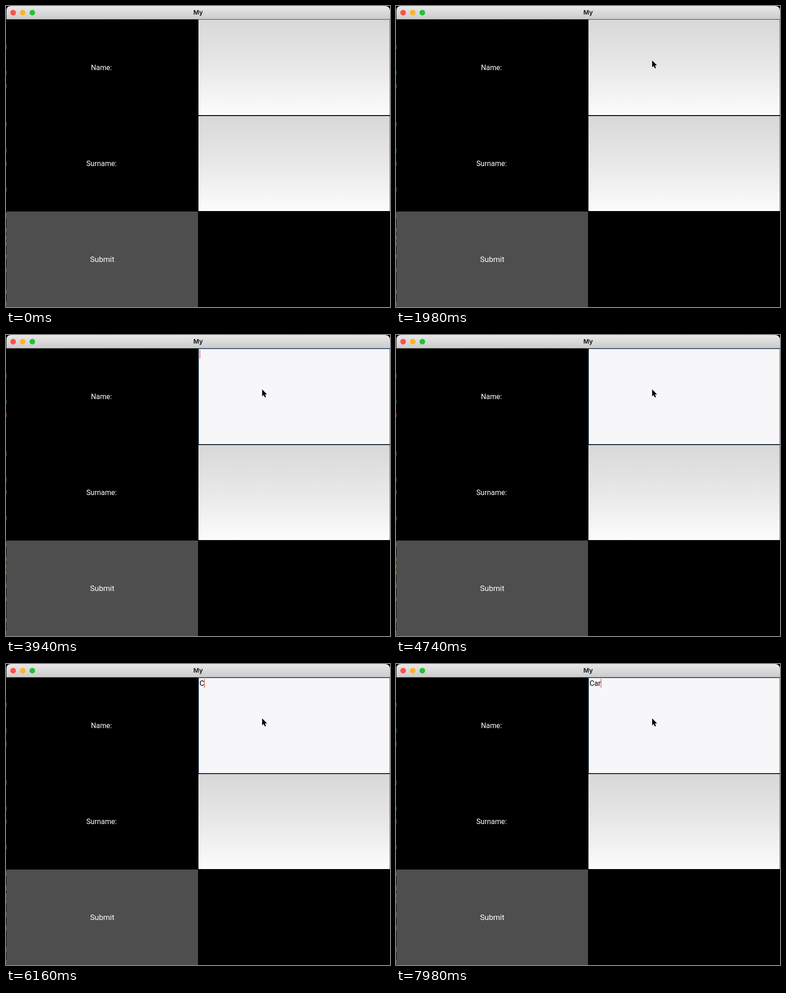
Animation of 846x662 px, one loop 8 s. Source, as an HTML page:

```html
<!DOCTYPE html>
<html lang="en">
<head>
<meta charset="utf-8">
<title>My</title>
<style>
  html, body { margin: 0; width: 100%; height: 100%; overflow: hidden; background: #000; }
  svg { display: block; width: 100vw; height: 100vh; }
  text { font-family: Roboto, sans-serif; font-size: 15.9px; fill: #fff; }
  .mid { text-anchor: middle; }
  .title { font: 700 13.7px Inter, sans-serif; fill: #262626; }
</style>
</head>
<body>
<svg viewBox="0 0 846 662">
  <defs>
    <linearGradient id="bar" x2="0" y2="1">
      <stop stop-color="#e8e8e8"/><stop offset="1" stop-color="#cbcbcb"/>
    </linearGradient>
    <linearGradient id="field" x2="0" y2="1">
      <stop stop-color="#d8d8d9"/><stop offset=".5" stop-color="#e8e8e9"/><stop offset="1" stop-color="#fcfcfd"/>
    </linearGradient>
  </defs>
  <rect width="846" height="662"/>
  <g id="edge"></g>
  <path d="M1 29V10Q1 0 11 0H835Q845 0 846 10V29Z" fill="url(#bar)"/>
  <rect x="1" y="29" width="845" height="1" fill="#3a3a3a"/>
  <circle cx="15.7" cy="14.7" r="6.2" fill="#fe5049"/>
  <circle cx="36.8" cy="14.7" r="6.2" fill="#fdb32b"/>
  <circle cx="58" cy="14.7" r="6.2" fill="#20c336"/>
  <text class="mid title" x="423.3" y="19.3">My</text>

  <rect x="424" y="30" width="421.5" height="210" fill="url(#field)"/>
  <rect x="424" y="242" width="421.5" height="209" fill="url(#field)"/>
  <g id="focus">
    <rect x="424" y="29" width="422" height="212" fill="#17324c"/>
    <rect x="424" y="30" width="422" height="210" fill="#497496"/>
    <rect x="425" y="31" width="420" height="209" fill="#f7f7f9"/>
  </g>
  <rect x="1" y="452" width="422" height="210" fill="#4e4e4e"/>

  <text class="mid" x="210.3" y="140.5">Name:</text>
  <text class="mid" x="210.5" y="351.7">Surname:</text>
  <text class="mid" x="212" y="563.4" style="font-size:17px">Submit</text>
  <text id="typed" x="426.5" y="47.8" style="fill:#000"></text>
  <rect id="caret" y="33" width="1.1" height="19" fill="#e62020"/>
  <path id="mouse" d="M0 0V15.5L3.5 12.3L5.9 17.8L8.5 16.7L6.1 11.3H10.8Z"
    stroke="#fff" stroke-width="1.8" paint-order="stroke" stroke-linejoin="round"/>
</svg>
<script>
const LOOP = 8000, FOCUS = 2855, BLINK = 530;
const ENTER = 1200, ARRIVE = 1700;
const keys = [
  { at: FOCUS, text: "", x: 426.6 },
  { at: 6100, text: "C", x: 436.9 },
  { at: 6640, text: "Ca", x: 445.6 },
  { at: 7600, text: "Car", x: 451 }
];
const el = id => document.getElementById(id);
const show = (node, on) => node.setAttribute("visibility", on ? "visible" : "hidden");
const [focus, typed, caret, mouse] = ["focus", "typed", "caret", "mouse"].map(el);

// Slivers of the window behind, along the left edge
el("edge").innerHTML = [90, 147, 176, 261, 318, 346, 403, 461, 493, 509, 522, 551, 581, 628, 655]
  .map((y, i) => `<rect y="${y - 5}" width="1" height="10" fill="${i % 3 == 1 && i < 5 ? "#24718c" : "#6c6c4a"}"/>`)
  .join("");

function draw(t) {
  const p = Math.min(1, Math.max(0, (t - ENTER) / (ARRIVE - ENTER)));
  const away = (1 - p) ** 3;
  mouse.setAttribute("transform", `translate(${564.3 + 282 * away} ${119.5 + 50 * away})`);
  show(mouse, t >= ENTER);
  show(focus, t >= FOCUS);

  const key = keys.filter(k => k.at <= t).pop();
  typed.textContent = key ? key.text : "";
  if (key) caret.setAttribute("x", key.x);
  show(caret, key && Math.floor((t - key.at) / BLINK) % 2 == 0);
}

const start = performance.now();
function tick() {
  draw((performance.now() - start) % LOOP);
  requestAnimationFrame(tick);
}
tick();
</script>
</body>
</html>
```
